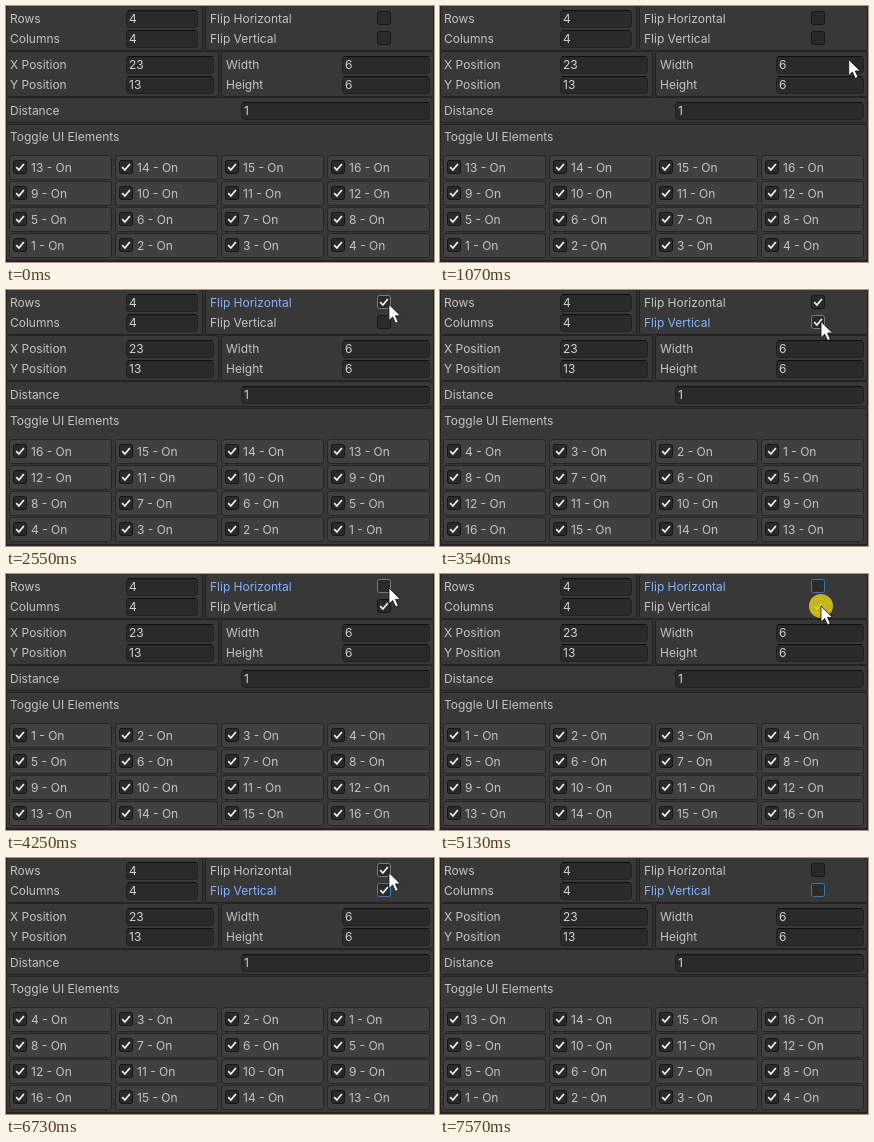
Recreate the animation shown at these times as an HTML page. Size 428 by 256 pixels, loop 8400 ms.

```html
<!DOCTYPE html>
<html lang="en">
<head>
<meta charset="utf-8">
<title>Toggle grid</title>
<style>
  html, body { margin: 0; width: 100%; height: 100%; overflow: hidden; background: #383838; }
  svg { display: block; width: 428px; height: 256px; }
  text { font: 12px Inter, Roboto, sans-serif; fill: #c4c4c4; white-space: pre; }
  .group { fill: #383838; stroke: #232323; }
  .cell { fill: #404040; stroke: #242424; }
  .field { fill: #2a2a2a; stroke: #212121; }
  .edge { stroke: #0d0d0d; }
  .value { fill: #d2d2d2; }
  .box { fill: #2a2a2a; stroke: #151515; }
  .tick { fill: none; stroke: #eee; stroke-width: 1.8; }
  .focus .box { stroke: #3a79bb; }
  .focus text { fill: #81b4ff; }
  .hover .box { stroke: #7a7a7a; }
</style>
</head>
<body>
<svg viewBox="0 0 428 256">
  <rect width="428" height="256" fill="#303030"/>
  <g id="panel"></g>
  <rect y="254" width="428" height="2" fill="#2b2024"/>
  <g id="pointer">
    <circle id="press" r="12" fill="#dccb1a" opacity=".85"/>
    <path d="M0 0V16l3.7-3.5 2.9 6.3 2.7-1.2-2.8-6.2H11.5Z" fill="#fff" stroke="#111" stroke-width=".8"/>
  </g>
</svg>
<script>
const LOOP = 8400;
const $ = id => document.getElementById(id);
const panel = $('panel'), pointer = $('pointer'), press = $('press');

function add(parent, tag, attrs, content = '') {
  const el = document.createElementNS('http://www.w3.org/2000/svg', tag);
  for (const key in attrs) el.setAttribute(key, attrs[key]);
  el.textContent = content;
  parent.append(el);
  return el;
}

// Rectangle with a crisp one-pixel border
const frame = (parent, cls, x, y, w, h, rx = 3) =>
  add(parent, 'rect', { class: cls, x: x + .5, y: y + .5, width: w - 1, height: h - 1, rx });
const label = (parent, x, y, str) => add(parent, 'text', { x, y }, str);

function field(x, y, w, value) {
  frame(panel, 'field', x, y, w, 18);
  add(panel, 'path', { class: 'edge', d: `M${x + 2} ${y + .5}h${w - 4}` });
  add(panel, 'text', { class: 'value', x: x + 3, y: y + 13 }, value);
}

function checkbox(parent, x, y) {
  frame(parent, 'box', x, y, 14, 14, 2);
  return add(parent, 'path', { class: 'tick', d: `M${x + 3.2} ${y + 7.2}l2.7 2.8 5-6` });
}

// Box of one or two lines; groups stack every 46px, lines every 20px
function group(x, right, level, names, build) {
  const top = level * 46;
  frame(panel, 'group', x, top - 1, right - x, names.length * 20 + 6);
  return names.map((name, i) => {
    const y = top + 4 + i * 20, g = add(panel, 'g', {});
    label(g, x + (x ? 5 : 4), y + 13, name);
    return build(g, y, i);
  });
}

const fields = (x, right, level, start, values) =>
  group(x, right, level, Object.keys(values), (g, y, i) =>
    field(start, y, right - (right < 428 ? 5 : 4) - start, Object.values(values)[i]));

fields(0, 197, 0, 120, { Rows: 4, Columns: 4 });
const flips = group(199, 428, 0, ['Flip Horizontal', 'Flip Vertical'],
  (g, y) => ({ g, y, tick: checkbox(g, 371, y + 1) }));
fields(0, 213, 1, 120, { 'X Position': 23, 'Y Position': 13 });
fields(215, 428, 1, 336, { Width: 6, Height: 6 });
fields(0, 428, 2, 235, { Distance: 1 });

frame(panel, 'group', 0, 118, 428, 137);
label(panel, 4, 135, 'Toggle UI Elements');
const cells = Array.from({ length: 16 }, (_, i) => {
  const x = 3 + i % 4 * 106, y = 149 + (i >> 2) * 26;
  frame(panel, 'cell', x, y, 103, 25);
  checkbox(panel, x + 4, y + 5);
  return label(panel, x + 22, y + 17, '');
});

// Presses alternate between the two flip boxes
const presses = [1870, 3060, 3970, 5130, 6030, 6480, 6860, 7350];
const FOCUS = 20, RELEASE = 90, CHANGE = 120, TRAVEL = 180;
const ENTER = 1000, ARRIVE = 1840, LEAVE = 7450, GONE = 7570;
const spots = [[383, 14], [381, 32]];

const clamp = u => Math.min(1, Math.max(0, u));
const smooth = u => u * u * (3 - 2 * u);
const mix = (a, b, u) => a.map((v, i) => v + (b[i] - v) * u);

function pointerAt(t) {
  if (t < ENTER || t >= GONE) return null;
  if (t < ARRIVE) {
    const u = (t - ENTER) / (ARRIVE - ENTER), bend = [327, 4];
    return mix(mix([424, 63], bend, u), mix(bend, spots[0], u), u);
  }
  if (t > LEAVE) return mix(spots[1], [428, 46], (t - LEAVE) / (GONE - LEAVE));
  // Set off earlier when there is more time before the next press
  const pos = presses.slice(1).reduce((p, at, i) => {
    const start = at - TRAVEL - .29 * (at - presses[i]);
    return mix(p, spots[(i + 1) % 2], smooth(clamp((t - start) / TRAVEL)));
  }, spots[0]);
  return pos;
}

function draw(t) {
  const on = [false, false];
  let focus = -1, down = false;
  presses.forEach((at, i) => {
    if (t >= at + FOCUS) focus = i % 2;
    if (t >= at && t < at + RELEASE) down = true;
    if (t >= at + CHANGE) on[i % 2] = !on[i % 2];
  });

  const pos = pointerAt(t);
  pointer.style.display = pos ? '' : 'none';
  if (pos) pointer.setAttribute('transform', `translate(${pos})`);
  press.style.display = down ? '' : 'none';

  flips.forEach(({ g, y, tick }, k) => {
    const over = pos && pos[0] >= 371 && pos[0] < 386 && pos[1] >= y && pos[1] < y + 16;
    g.classList.toggle('focus', k === focus);
    g.classList.toggle('hover', !!over);
    tick.style.opacity = on[k] ? 1 : 0;
  });

  cells.forEach((cell, i) => {
    const col = on[0] ? 3 - i % 4 : i % 4;
    const row = on[1] ? i >> 2 : 3 - (i >> 2);
    const str = `${row * 4 + col + 1} - On`;
    if (cell.textContent !== str) cell.textContent = str;
  });
}

const origin = performance.now();
function play() {
  draw((performance.now() - origin) % LOOP);
  requestAnimationFrame(play);
}
play();
</script>
</body>
</html>
```
